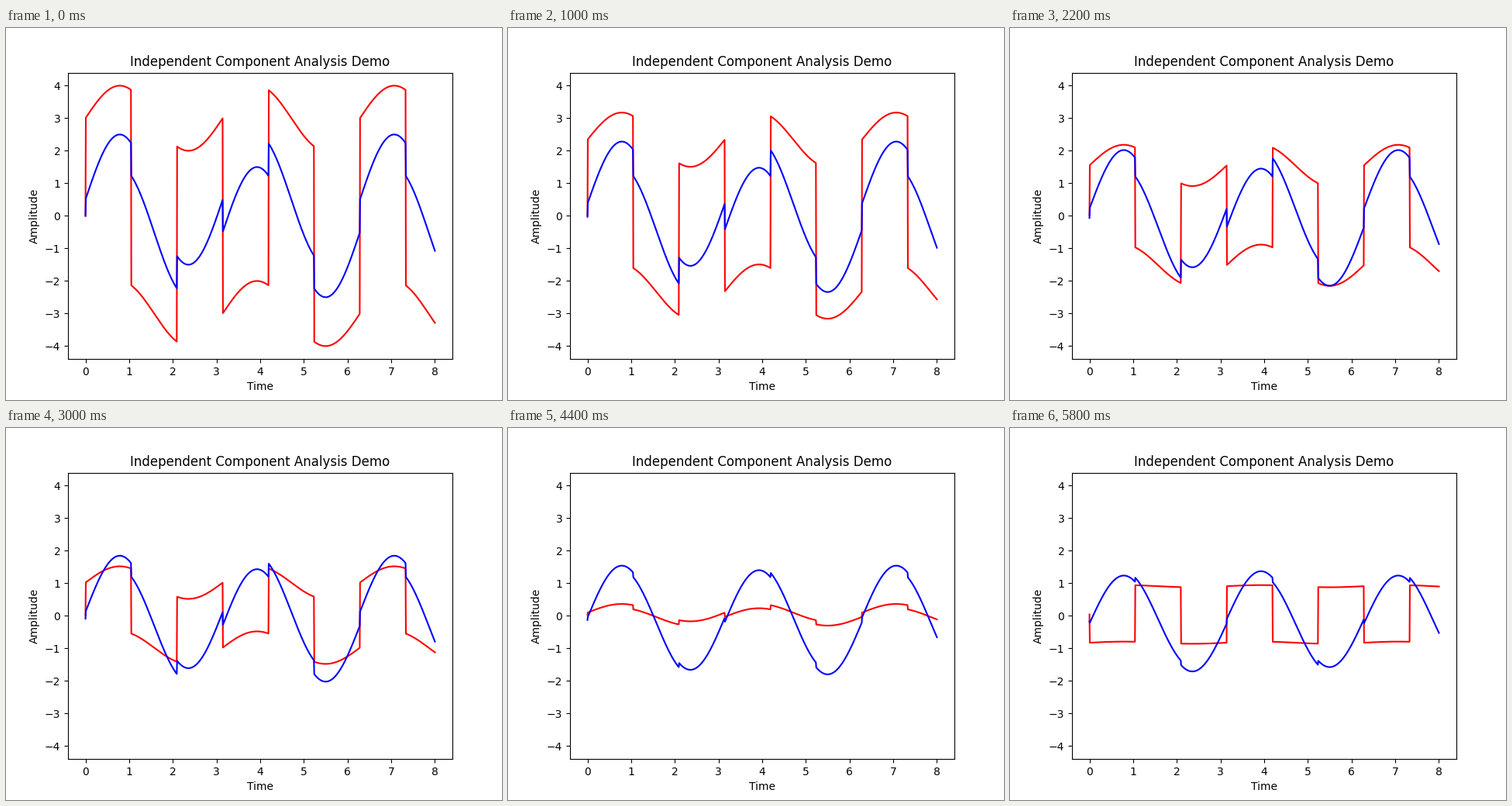
Animation of 640x480 px, one loop 6 s. Source, as a matplotlib script:

```python
import numpy as np
import matplotlib.pyplot as plt
from matplotlib.animation import FuncAnimation

STEPS = 30

t = np.linspace(0, 8, 1000)
sine = np.sin(2 * t)
square = np.sign(np.sin(3 * t))


def standardize(x):
    return (x - x.mean()) / x.std()


# Observed mixtures of the two sources
mixed = np.array([sine + 3 * square, 2 * sine + 0.5 * square])

# Recovered components: zero mean, unit variance, uncorrelated
first = standardize(-square)
rest = standardize(sine)
second = standardize(rest - (rest * first).mean() * first)
recovered = np.array([first, second])

fig, ax = plt.subplots(figsize=(6.4, 4.8), dpi=100)
lines = [ax.plot(t, y, color=c)[0] for y, c in zip(mixed, ("red", "blue"))]
ax.set_xlim(-0.4, 8.4)
ax.set_ylim(-4.4, 4.4)
ax.set_title("Independent Component Analysis Demo")
ax.set_xlabel("Time")
ax.set_ylabel("Amplitude")


def update(i):
    k = i / STEPS
    for line, y in zip(lines, (1 - k) * mixed + k * recovered):
        line.set_ydata(y)
    return lines


anim = FuncAnimation(fig, update, frames=STEPS, interval=200,
                     repeat=True, repeat_delay=0)
plt.show()
```
